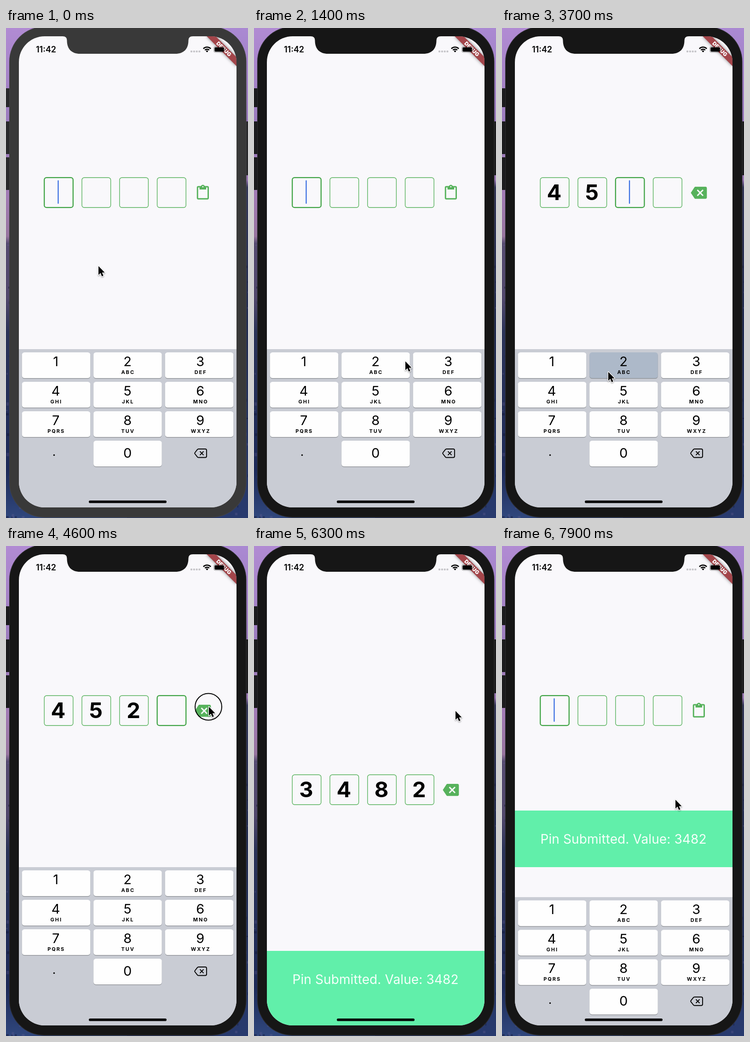
An HTML page with a canvas for the animation above (8 s loop, 526 by 1065 pixels).

```html
<!DOCTYPE html>
<html lang="en">
<head>
<meta charset="utf-8">
<title>Pin entry</title>
<style>
  html, body { margin: 0; width: 100%; height: 100%; overflow: hidden; }
  canvas { display: block; width: 526px; height: 1065px; }
</style>
</head>
<body>
<canvas id="stage" width="526" height="1065"></canvas>
<script>
const ctx = document.getElementById('stage').getContext('2d');
const LOOP = 8000, STEP = 100;
const W = 526, H = 1065;
const SCREEN = { x: 28, y: 18, w: 473, h: 1024, r: 56 };
const KEYBOARD_H = 344;
const PAPER = '#f9f8fb', GREEN = '#57b25c', FOCUS_GREEN = '#3fa344';

const FOCUS_AT = 600;
const CLEAR_AT = 4700, PASTE_AT = 5600, RESET_AT = 7400, REFOCUS_AT = 7650;
const PRESSES = [[2800, '4'], [3200, '5'], [3700, '2']];
const CLICKS = [[4500, 4700], [5500, 5600], [7200, 7400]];
const POINTER = [
  [0, 200, 516], [500, 200, 516], [1200, 322, 715], [1400, 328, 723], [1800, 322, 728],
  [2500, 155, 785], [2600, 153, 786], [2900, 148, 788], [3200, 232, 793],
  [3600, 230, 746], [3900, 230, 746], [4500, 440, 348], [5600, 440, 348],
  [6300, 437, 357], [7000, 438, 352], [7450, 436, 352], [7900, 376, 550]
];
const LETTERS = ['', 'ABC', 'DEF', 'GHI', 'JKL', 'MNO', 'PQRS', 'TUV', 'WXYZ'];

const pasteIcon = new Path2D('M19 2h-4.18C14.4.84 13.3 0 12 0c-1.3 0-2.4.84-2.82 2H5c-1.1 0-2 .9-2 2v16c0 1.1.9 2 2 2h14c1.1 0 2-.9 2-2V4c0-1.1-.9-2-2-2zm-7 0c.55 0 1 .45 1 1s-.45 1-1 1-1-.45-1-1 .45-1 1-1zm7 18H5V4h2v3h10V4h2v16z');
const clearIcon = new Path2D('M22 3H7c-.69 0-1.23.35-1.59.88L0 12l5.41 8.11c.36.53.9.89 1.59.89h15c1.1 0 2-.9 2-2V5c0-1.1-.9-2-2-2zm-3 12.59L17.59 17 14 13.41 10.41 17 9 15.59 12.59 12 9 8.41 10.41 7 14 10.59 17.59 7 19 8.41 15.41 12 19 15.59z');
const arrow = new Path2D('M0 0V19.2L4.4 15.1 7.4 22.2 10.7 20.8 7.7 13.9H13.6Z');
const deleteKey = new Path2D('M418.5 915H433Q436 915 436 918V930.5Q436 933.5 433 933.5H418.5Q417 933.5 416 932.3L410.6 925.5Q409.6 924.2 410.6 923L416 916.2Q417 915 418.5 915ZM421.5 920.2 429.5 928.3M429.5 920.2 421.5 928.3');

const clamp = v => Math.max(0, Math.min(1, v));
const mix = (a, b, k) => a + (b - a) * k;

function roundRect(x, y, w, h, r) {
  ctx.beginPath();
  ctx.roundRect(x, y, w, h, r);
}

function fillRound(x, y, w, h, r, color) {
  roundRect(x, y, w, h, r);
  ctx.fillStyle = color;
  ctx.fill();
}

function label(text, x, y, size, weight, color = '#000', spacing = 0) {
  ctx.font = `${weight} ${size}px Inter, sans-serif`;
  ctx.letterSpacing = spacing + 'px';
  ctx.textAlign = 'center';
  ctx.fillStyle = color;
  ctx.fillText(text, x + spacing / 2, y);
  ctx.letterSpacing = '0px';
}

function verticalGradient(stops) {
  const g = ctx.createLinearGradient(0, 0, 0, H);
  stops.forEach(([at, color]) => g.addColorStop(at, color));
  return g;
}

const leftWall = verticalGradient([[0, '#b18bd3'], [0.2, '#9b7cbd'], [0.34, '#a27bb5'],
  [0.425, '#98759f'], [0.44, '#554b70'], [0.55, '#52486c'], [0.62, '#2b3358'], [0.9, '#1d2a58'], [1, '#30477d']]);
const rightWall = verticalGradient([[0, '#aa89d2'], [0.2, '#9879bb'], [0.31, '#9a78b3'],
  [0.325, '#343758'], [0.6, '#222c50'], [1, '#283a6e']]);

function drawWallpaper() {
  ctx.fillStyle = leftWall;
  ctx.fillRect(0, 0, W / 2, H);
  ctx.fillStyle = rightWall;
  ctx.fillRect(W / 2, 0, W / 2, H);
  let seed = 7;
  const rand = () => (seed = seed * 16807 % 2147483647) / 2147483647;
  for (let i = 0; i < 130; i++) {
    const x = i % 2 ? rand() * 40 : W - rand() * 40;
    const y = mix(470, H, rand());
    ctx.fillStyle = rand() < 0.5 ? 'rgba(16,22,52,.45)' : 'rgba(112,100,150,.25)';
    ctx.fillRect(x, y, 2 + rand() * 5, 2 + rand() * 6);
  }
}

function drawBody(active) {
  const button = active ? '#1b1b1d' : '#29292b';
  [[-4, 131, 41], [-4, 203, 71], [-4, 281, 71], [520, 203, 117]].forEach(([x, y, h]) =>
    fillRound(x, y, 12, h, 2, button));
  fillRound(7, -3, 515.5, 1067, 76, active ? '#2c2c2d' : '#424242');
  fillRound(8.2, -1.8, 513.1, 1064.6, 75, active ? '#161616' : '#393939');
}

function drawNotch(active) {
  ctx.fillStyle = active ? '#161616' : '#393939';
  ctx.beginPath();
  ctx.moveTo(123, 17);
  ctx.lineTo(123, 18);
  ctx.quadraticCurveTo(132.5, 18, 132.5, 27);
  ctx.bezierCurveTo(132.5, 46, 143, 56, 161, 56);
  ctx.lineTo(368, 56);
  ctx.bezierCurveTo(386, 56, 396.5, 46, 396.5, 27);
  ctx.quadraticCurveTo(396.5, 18, 406, 18);
  ctx.lineTo(406, 17);
  ctx.fill();
}

function drawBanner() {
  ctx.save();
  ctx.translate(SCREEN.x + SCREEN.w, SCREEN.y);
  ctx.rotate(Math.PI / 4);
  ctx.shadowColor = 'rgba(0,0,0,.5)';
  ctx.shadowBlur = 7;
  ctx.fillStyle = '#a3454a';
  ctx.fillRect(-46, 32, 92, 13.7);
  ctx.shadowColor = 'transparent';
  label('DEBUG', 0, 43, 11.6, 900, '#fff');
  ctx.restore();
}

function drawStatus() {
  label('11:42', 87, 53, 18, 600);
  for (let i = 0; i < 4; i++) fillRound(401 + i * 5.8, 49, 4, 4, 1.3, '#c6c5c9');
  ctx.strokeStyle = ctx.fillStyle = '#000';
  ctx.lineWidth = 2.7;
  [6.4, 11].forEach(r => {
    ctx.beginPath();
    ctx.arc(437, 52.5, r, -Math.PI * 0.76, -Math.PI * 0.24);
    ctx.stroke();
  });
  ctx.beginPath();
  ctx.moveTo(437, 53);
  ctx.arc(437, 52.5, 3.6, -Math.PI * 0.76, -Math.PI * 0.24);
  ctx.fill();
  roundRect(451.5, 40.5, 24, 12.5, 3.5);
  ctx.lineWidth = 1;
  ctx.strokeStyle = 'rgba(0,0,0,.4)';
  ctx.stroke();
  fillRound(453.2, 42, 20.6, 9.5, 2.2, '#000');
  fillRound(476.5, 44.5, 1.5, 4.5, 1, 'rgba(0,0,0,.4)');
}

function drawPin(pin, focus, caretOn, y) {
  for (let i = 0; i < 4; i++) {
    const x = 83 + i * 81.8;
    const focused = i === focus;
    roundRect(x + 0.2, y + 0.2, 62.6, 65, 5);
    ctx.strokeStyle = focused ? FOCUS_GREEN : GREEN;
    ctx.lineWidth = focused ? 2.3 : 1.4;
    ctx.stroke();
    if (pin[i]) label(pin[i], x + 30.5, y + 49, 47, 700);
    if (focused && caretOn) fillRound(x + 29.3, y + 6, 2.3, 51, 1, '#3a6fe2');
  }
  ctx.save();
  ctx.translate(410.4, y + 15.7);
  ctx.scale(1.455, 1.455);
  ctx.fillStyle = GREEN;
  ctx.fill(pin ? clearIcon : pasteIcon);
  ctx.restore();
}

function drawSnackbar(top, height) {
  ctx.fillStyle = '#61efaa';
  ctx.fillRect(SCREEN.x, top, SCREEN.w, height);
  label('Pin Submitted. Value: 3482', 264, top + 72, 28, 400, '#f5fffa', 0.1);
}

function drawKey(n, x, y, pressed) {
  fillRound(x, y + 1.3, 148.5, 56, 5.5, '#898c91');
  fillRound(x, y, 148.5, 56, 5.5, pressed ? '#adb9c9' : '#fefefe');
  const cx = x + (x < 100 ? 73.5 : x < 300 ? 74 : 76.5);
  const sub = LETTERS[n - 1];
  label(n, cx, y + (n ? 30 : 37), 29, 400);
  if (sub) label(sub, cx, y + 46.6, 11, 700, '#000', 2);
}

function drawKeyboard(offset, pressedKey) {
  ctx.save();
  ctx.translate(0, offset);
  ctx.fillStyle = '#c9ccd4';
  ctx.fillRect(SCREEN.x, 698, SCREEN.w, KEYBOARD_H);
  for (let n = 1; n <= 9; n++) {
    const col = (n - 1) % 3, row = Math.floor((n - 1) / 3);
    drawKey(n, 34.7 + col * 155.5, 705 + row * 64, String(n) === pressedKey);
  }
  drawKey(0, 190.2, 897, false);
  fillRound(102.8, 926.6, 3.4, 3.4, 1.7, '#000');
  ctx.strokeStyle = '#000';
  ctx.lineWidth = 1.9;
  ctx.stroke(deleteKey);
  ctx.restore();
}

function pointerAt(t) {
  const i = POINTER.findIndex(p => p[0] > t);
  if (i < 0) return POINTER[POINTER.length - 1].slice(1);
  const [t0, x0, y0] = POINTER[i - 1], [t1, x1, y1] = POINTER[i];
  const k = (t - t0) / (t1 - t0), e = k * k * (3 - 2 * k);
  return [mix(x0, x1, e), mix(y0, y1, e)];
}

function drawPointer(t) {
  const [x, y] = pointerAt(t);
  if (CLICKS.some(([from, to]) => t >= from && t < to)) {
    ctx.beginPath();
    ctx.arc(x, y + 1.5, 29, 0, Math.PI * 2);
    ctx.strokeStyle = '#000';
    ctx.lineWidth = 2;
    ctx.stroke();
  }
  ctx.save();
  ctx.translate(x + 1, y + 1.5);
  ctx.shadowColor = 'rgba(0,0,0,.35)';
  ctx.shadowBlur = 3;
  ctx.shadowOffsetY = 1.5;
  ctx.strokeStyle = '#fff';
  ctx.lineWidth = 2.6;
  ctx.lineJoin = 'round';
  ctx.stroke(arrow);
  ctx.shadowColor = 'transparent';
  ctx.fillStyle = '#000';
  ctx.fill(arrow);
  ctx.restore();
}

function stateAt(t) {
  let pin = '', caretStart = 0;
  if (t < CLEAR_AT) {
    PRESSES.forEach(([at, digit]) => {
      if (t >= at + 100) { pin += digit; caretStart = at + 100; }
    });
  } else if (t < PASTE_AT) {
    caretStart = CLEAR_AT;
  } else if (t < RESET_AT) {
    pin = '3482';
  } else {
    caretStart = REFOCUS_AT;
  }
  const editing = t < PASTE_AT || t >= REFOCUS_AT;
  const pressed = PRESSES.find(([at]) => t >= at && t < at + 200);
  let offset = 0;
  if (t >= REFOCUS_AT) offset = KEYBOARD_H * (1 - clamp((t - REFOCUS_AT) / 500)) ** 2.4;
  else if (t >= PASTE_AT) offset = KEYBOARD_H * (1 - (1 - clamp((t - PASTE_AT) / 500)) ** 2.4);
  return {
    pin, editing, offset,
    focus: editing ? pin.length : -1,
    caretOn: (t - caretStart) % 1000 < 500,
    pressedKey: pressed && pressed[1]
  };
}

function render(t) {
  const s = stateAt(t), active = t >= FOCUS_AT;
  drawWallpaper();
  drawBody(active);

  ctx.save();
  roundRect(SCREEN.x, SCREEN.y, SCREEN.w, SCREEN.h, SCREEN.r);
  ctx.clip();
  ctx.fillStyle = PAPER;
  ctx.fillRect(SCREEN.x, SCREEN.y, SCREEN.w, SCREEN.h);
  drawPin(s.pin, s.focus, s.caretOn, s.editing ? 325 : 497);
  if (t >= PASTE_AT) {
    const height = s.editing ? 123 : 162;
    const shown = 1 - (1 - clamp((t - PASTE_AT - 50) / 300)) ** 3;
    drawSnackbar((s.editing ? 698 : 1042) - height * shown, height);
  }
  drawBanner();
  if (s.offset < KEYBOARD_H) drawKeyboard(s.offset, s.pressedKey);
  drawNotch(active);
  drawStatus();
  fillRound(180, 1027, 169, 5.6, 2.8, '#000');
  ctx.restore();

  drawPointer(t);
}

function tick() {
  const t = performance.now() % LOOP;
  render(Math.floor(t / STEP) * STEP);
  requestAnimationFrame(tick);
}
tick();
</script>
</body>
</html>
```
